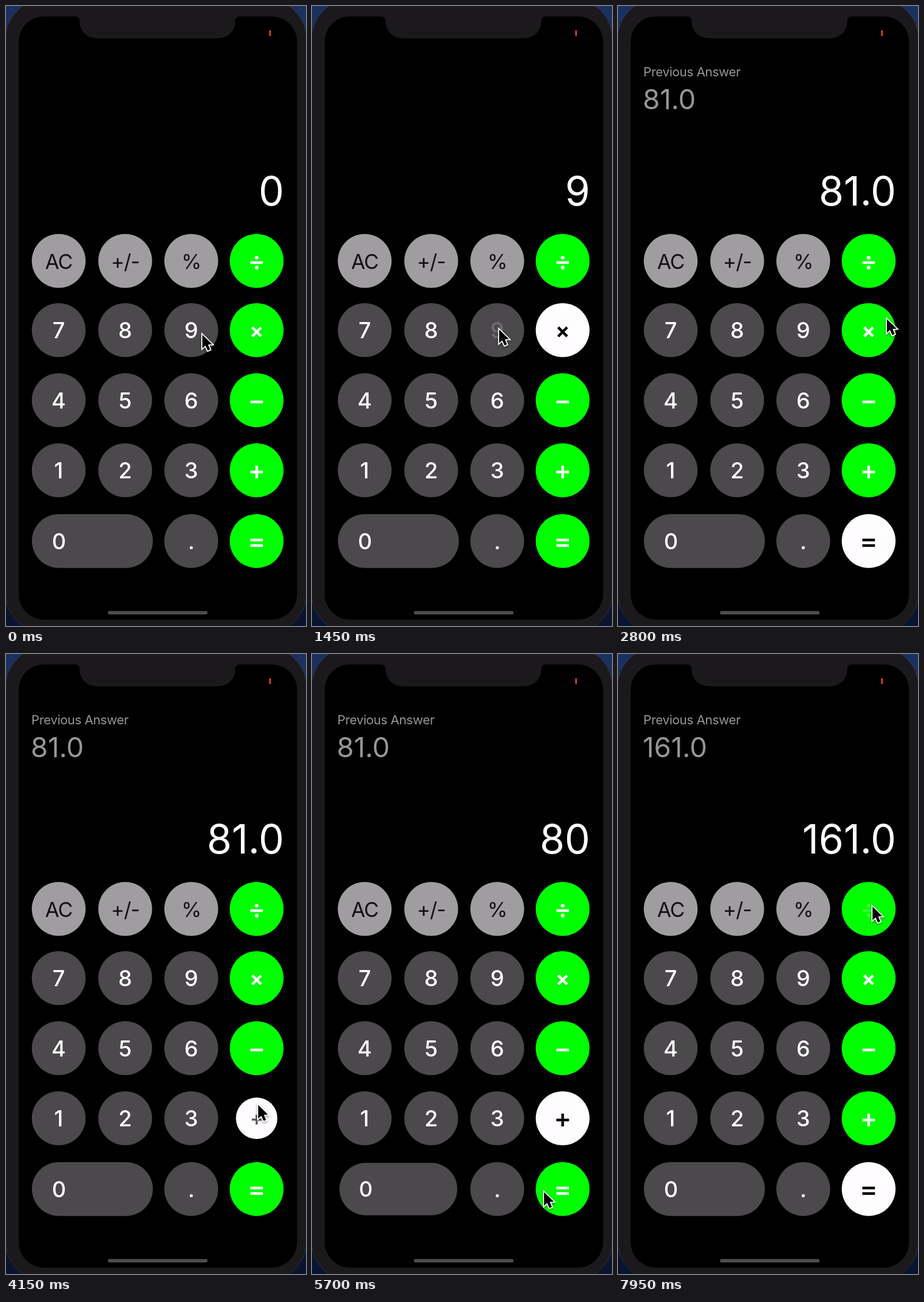
An HTML page with a canvas that plays this animation: 521x1075 px, repeating every 8 s.

```html
<!DOCTYPE html>
<html lang="en">
<head>
<meta charset="utf-8">
<title>Calculator</title>
<style>
html, body { margin: 0; width: 100%; height: 100%; overflow: hidden; background: #000; }
canvas { display: block; }
</style>
</head>
<body>
<canvas id="stage" width="521" height="1075"></canvas>
<script>
const ctx = document.getElementById('stage').getContext('2d');
const LOOP = 8000;
const POP = 350;
const FONT = 'Inter, Roboto, sans-serif';
const COLS = [91.5, 207, 321.7, 435.3];
const ROWS = [442, 562, 683.5, 805, 927.7];
const RADIUS = 46.7;
const GREY = '#9f9d9f', DARK = '#4b494b', GREEN = '#00ff00', WHITE = '#fffdff';

const keys = [
  ['AC', '+/-', '%', '÷'],
  ['7', '8', '9', '×'],
  ['4', '5', '6', '−'],
  ['1', '2', '3', '+'],
  ['0', null, '.', '=']
].flatMap((row, r) => row.map((label, c) => ({
  label, x: label === '0' ? 150 : COLS[c], y: ROWS[r],
  half: label === '0' ? 105 : RADIUS,
  operator: c === 3, utility: r === 0 && c < 3
}))).filter(key => key.label);

// Every press: key, time down, time up, and what the display shows afterwards.
const presses = [
  { key: '9', down: 400, up: 500, shown: '9' },
  { key: '×', down: 880, up: 980 },
  { key: '9', down: 1400, up: 1520 },
  { key: '=', down: 2120, up: 2230, shown: '81.0', answer: '81.0' },
  { key: '+', down: 3920, up: 4040 },
  { key: '8', down: 4650, up: 4760, shown: '8' },
  { key: '0', down: 5300, up: 5420, shown: '80' },
  { key: '=', down: 6040, up: 6150, shown: '161.0', answer: '161.0' },
  { key: '÷', down: 7880, up: 8100 }
];

// Pointer stops: time, x, y.
const pointerPath = [
  [0, 340, 568], [50, 340, 568], [100, 338, 566], [540, 338, 566],
  [850, 441, 564], [1080, 441, 564], [1380, 324, 559], [1560, 324, 559],
  [2050, 441, 915], [2350, 441, 915], [2800, 466, 541], [3150, 467, 541],
  [3750, 437, 780], [4200, 437, 780], [4600, 210, 572], [4820, 210, 572],
  [5220, 190, 928], [5430, 190, 928], [5700, 402, 931], [5980, 455, 942],
  [6200, 469, 950], [6500, 469, 950], [7150, 468, 810], [7750, 441, 436],
  [LOOP, 441, 436]
];

const smooth = u => u * u * (3 - 2 * u);
const mix = (a, b, u) => a + (b - a) * u;

function pointerAt(t) {
  const i = pointerPath.findIndex(stop => stop[0] > t);
  const [t0, x0, y0] = pointerPath[i - 1];
  const [t1, x1, y1] = pointerPath[i];
  const u = smooth((t - t0) / (t1 - t0));
  return [mix(x0, x1, u), mix(y0, y1, u)];
}

function stateAt(t) {
  const state = { shown: '0', answer: '', selected: '' };
  for (const p of presses) {
    if (p.up > t) break;
    if (p.shown) state.shown = p.shown;
    if (p.answer) state.answer = p.answer;
    if ('÷×−+='.includes(p.key)) state.selected = p.key;
  }
  return state;
}

// Held keys dim their label; released keys spring back from a smaller size.
function poseAt(label, t) {
  const press = presses.filter(p => p.key === label && p.down <= t).pop();
  if (!press) return { scale: 1, alpha: 1 };
  if (t < press.up) return { scale: 1, alpha: 0.2 };
  const u = Math.min(1, (t - press.up) / POP);
  return { scale: mix(0.7, 1, smooth(u)), alpha: mix(0.2, 1, 1 - (1 - u) ** 2) };
}

function fillRound(x, y, w, h, r, color) {
  ctx.fillStyle = color;
  ctx.beginPath();
  ctx.roundRect(x, y, w, h, r);
  ctx.fill();
}

function text(str, x, y, size, color, align = 'center', weight = 400, spacing = 0) {
  ctx.font = `${weight} ${size}px ${FONT}`;
  ctx.letterSpacing = spacing + 'px';
  ctx.textAlign = align;
  ctx.fillStyle = color;
  ctx.fillText(str, x, y);
}

function drawPhone() {
  const sky = ctx.createLinearGradient(0, 0, 0, 1075);
  sky.addColorStop(0, '#1b315f');
  sky.addColorStop(1, '#0a1430');
  ctx.fillStyle = sky;
  ctx.fillRect(0, 0, 521, 1075);
  fillRound(-1, -12, 523, 1099, 70, '#1b191c');
  ctx.strokeStyle = '#343236';
  ctx.lineWidth = 1;
  ctx.stroke();
  fillRound(22, 18, 483.5, 1046, 44, '#000');

  ctx.fillStyle = '#1b191c';
  ctx.beginPath();
  ctx.moveTo(119, 17);
  ctx.lineTo(119, 18);
  ctx.quadraticCurveTo(128, 18, 128, 27);
  ctx.bezierCurveTo(128, 44, 141, 56, 159, 56);
  ctx.lineTo(367, 56);
  ctx.bezierCurveTo(385, 56, 398, 44, 398, 27);
  ctx.quadraticCurveTo(398, 18, 407, 18);
  ctx.lineTo(407, 17);
  ctx.fill();

  fillRound(457, 42, 3, 10, 1, '#e0372d');
  fillRound(177, 1049, 173, 6, 3, '#4c4b4d');
}

function drawOperator(label, color) {
  ctx.fillStyle = color;
  const bar = (y, w = 22) => ctx.fillRect(-w / 2, y - 2.3, w, 4.6);
  const dot = y => {
    ctx.beginPath();
    ctx.arc(0, y, 3.2, 0, Math.PI * 2);
    ctx.fill();
  };
  ctx.save();
  ctx.translate(0, 3);
  if (label === '×') ctx.rotate(Math.PI / 4);
  if (label === '=') {
    bar(-4.8);
    bar(4.8);
  } else {
    bar(0);
  }
  if (label === '÷') {
    dot(-8.5);
    dot(8.5);
  }
  if (label === '+' || label === '×') {
    ctx.fillRect(-2.3, -11, 4.6, 8.7);
    ctx.fillRect(-2.3, 2.3, 4.6, 8.7);
  }
  ctx.restore();
}

function drawKey(key, t, selected) {
  const { label, half } = key;
  const { scale, alpha } = poseAt(label, t);
  const lit = label === selected;
  // The wide key shrinks by less than the round ones.
  const size = label === '0' ? mix(1, scale, 0.85) : scale;
  ctx.save();
  ctx.translate(key.x, key.y);
  ctx.scale(size, size);
  const face = key.utility ? GREY : key.operator ? (lit ? WHITE : GREEN) : DARK;
  fillRound(-half, -RADIUS, half * 2, RADIUS * 2, RADIUS, face);
  ctx.globalAlpha = alpha;
  if (key.operator) drawOperator(label, lit ? '#000' : WHITE);
  else if (key.utility) text(label, 0, 14, 35.5, '#121012', 'center', 400, -1);
  else text(label, label === '0' ? -58 : 0, 14, 38, WHITE, 'center', 500);
  ctx.restore();
}

function drawPointer(x, y) {
  ctx.save();
  ctx.translate(x + 1, y + 2);
  ctx.beginPath();
  [[0, 0], [0, 23.5], [5.4, 18.7], [9.4, 27.6], [13.6, 25.8], [9.8, 17], [17, 16.6]]
    .forEach(([px, py]) => ctx.lineTo(px, py));
  ctx.closePath();
  ctx.shadowColor = 'rgba(0,0,0,.4)';
  ctx.shadowBlur = 4;
  ctx.shadowOffsetY = 2;
  ctx.strokeStyle = '#fff';
  ctx.lineWidth = 3.6;
  ctx.stroke();
  ctx.shadowColor = 'transparent';
  ctx.fillStyle = '#000';
  ctx.fill();
  ctx.restore();
}

function draw(now) {
  const t = now % LOOP;
  const state = stateAt(t);
  drawPhone();
  if (state.answer) {
    text('Previous Answer', 44, 122, 22, '#979597', 'left', 400, -0.4);
    text(state.answer, 43, 179, 48, '#979597', 'left');
  }
  text(state.shown, 483, 346, 70, WHITE, 'right');
  keys.forEach(key => drawKey(key, t, state.selected));
  drawPointer(...pointerAt(t));
}

const start = performance.now();
function tick() {
  draw(performance.now() - start);
  requestAnimationFrame(tick);
}
tick();
</script>
</body>
</html>
```
